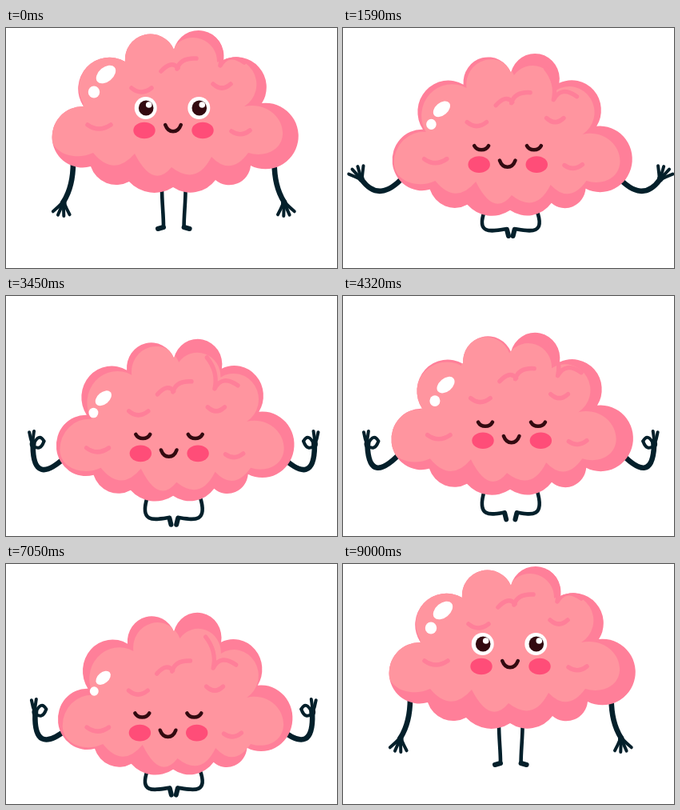
An HTML page with a canvas for the animation above (9.03 s loop, 414 px wide and 300 px high).

```html
<!DOCTYPE html>
<html lang="en">
<head>
<meta charset="utf-8">
<title>Calm brain</title>
<style>
html, body { margin: 0; width: 100%; height: 100%; overflow: hidden; background: #fff; }
canvas { display: block; width: 414px; height: 300px; }
</style>
</head>
<body>
<canvas id="stage" width="414" height="300"></canvas>
<script>
const ctx = document.getElementById('stage').getContext('2d');
const LOOP = 9030, MID = 211, AXIS = 209.8, BOB = 2220;
const DARK = '#ff7f99', LIGHT = '#ff959f', CHEEK = '#ff4d78', INK = '#330a10', LIMB = '#04202b';

const cloud = new Path2D(
  'M149 42 A31.8 31.8 0 0 1 210 27 A31.7 31.7 0 0 1 272 40' +
  'A37.6 37.6 0 0 1 320 94 A41.3 41.3 0 1 1 306 172' +
  'A26.8 26.8 0 0 1 262 190 A39 39 0 0 1 209 199' +
  'A43 43 0 0 1 154 192 A33.7 33.7 0 0 1 106 173' +
  'A38.2 38.2 0 1 1 97 98 A39.2 39.2 0 0 1 149 42Z');

const glow = new Path2D(
  'M149 40 A31.8 31.8 0 0 1 210 24 A30 30 0 0 1 264 43' +
  'A32.2 32.2 0 0 1 298 98 C325 92 348 112 346 134' +
  'C344 154 322 162 303 156 Q281 186 257 161 Q238 198 207 174' +
  'Q184 202 161 157 Q135 187 109 156 C88 166 57 158 56 134' +
  'A38.2 38.2 0 0 1 97 95 A39.2 39.2 0 0 1 149 40Z');

const folds = new Path2D(
  'M194 54 Q207 40 215 50 M214 51 Q218 37 238 38' +
  'M157 75 Q169 85 182 75 M259 70 Q270 80 281 70' +
  'M102 121 Q116 131 131 121 M282 129 Q294 137 305 128' +
  'M258 8 Q273 26 268 47 Q278 29 298 43');

const mix = (a, b, f) => a + (b - a) * f;
const mixAll = (a, b, f) => a.map((v, i) => mix(v, b[i], f));
const ramp = (t, a, b) => Math.min(1, Math.max(0, (t - a) / (b - a)));
const ease = (t, a, b) => (1 - Math.cos(Math.PI * ramp(t, a, b))) / 2;

// Fold is 0 standing and 1 seated; sink is 0 at the top of a bob and 1 at its foot.
function poseAt(t) {
  const bobbing = t > 2910 && t < 7350;
  const sink = bobbing ? (1 + Math.cos((t - 2910) / BOB * 2 * Math.PI)) / 2 : 1;
  const sway = bobbing ? (1 - Math.cos((t - 2910) / BOB * Math.PI)) / 2 : 0;
  const late = t > 5000;
  const p = late ? 1 - ease(t, 7350, 8656) : ease(t, 370, 2910);
  return {
    sink, sway,
    top: bobbing ? 42 + 22.5 * sink : 3 + 61.5 * p,
    wide: bobbing ? 0.989 - 0.044 * sink : 1 - 0.055 * p,
    dx: bobbing ? -7 + 12.3 * sway : -7 * p,
    dy: bobbing ? 7 + 28 * sink : 35 * p,
    out: late ? 1 - ease(t, 7850, 8720) : ease(t, 370, 1450),
    calm: late ? 1 - ease(t, 7300, 7850) : ease(t, 1450, 2550),
    fold: late ? 1 - ease(t, 7400, 8000) : ease(t, 500, 1400),
    shut: late ? 1 - ramp(t, 8180, 8360) : ramp(t, 720, 900)
  };
}

function oval(x, y, rx, ry, color, turn = 0) {
  ctx.fillStyle = color;
  ctx.beginPath();
  ctx.ellipse(x, y, rx, ry, turn, 0, 2 * Math.PI);
  ctx.fill();
}

function smile(x, y, w, h, width) {
  ctx.lineWidth = width;
  ctx.beginPath();
  ctx.moveTo(x - w, y);
  ctx.bezierCurveTo(x - w * 0.6, y + h, x + w * 0.6, y + h, x + w, y);
  ctx.stroke();
}

function mirrored(draw) {
  draw();
  ctx.save();
  ctx.translate(2 * AXIS, 0);
  ctx.scale(-1, 1);
  draw();
  ctx.restore();
}

function arm(p) {
  const up = p.top - 3;
  const rise = (1 - p.sink) * 9;
  const stand = [84, 168 + up, 84, 198 + up, 72, 217 + up];
  const open = [76, 186, 46, 219, 23, 190];
  const rest = [76, p.top + 146, 35 - rise * 0.3, 240, 38 - rise, 187];
  const [sx, sy, cx, cy, wx, wy] = mixAll(mixAll(stand, open, p.out), rest, p.calm);
  ctx.lineWidth = 6.6;
  ctx.beginPath();
  ctx.moveTo(sx, sy);
  ctx.quadraticCurveTo(cx, cy, wx, wy);
  ctx.stroke();

  const dir = mix(mix(101, 238, p.out), 268, p.calm) * Math.PI / 180 + Math.PI / 2;
  // Each finger: control point and tip, spread then pinched into a ring.
  const spread = [-36, -12, 12, 36].map(a => {
    const r = a * Math.PI / 180;
    return [Math.sin(r) * 9, -Math.cos(r) * 10, Math.sin(r) * 18, -Math.cos(r) * 18];
  });
  const pinch = [[-3, -9, -4, -17], [0, -10, 2, -18], [8, -17, 14, -5], [9, 8, 14, -5]];
  ctx.save();
  ctx.translate(wx, wy);
  ctx.rotate(dir);
  ctx.lineWidth = 4;
  spread.forEach((f, i) => {
    const [ax, ay, bx, by] = mixAll(f, pinch[i], p.calm);
    ctx.beginPath();
    ctx.moveTo(0, 0);
    ctx.quadraticCurveTo(ax, ay, bx, by);
    ctx.stroke();
  });
  oval(0, -2, 4, 5, LIMB);
  ctx.restore();
}

function leg(p) {
  const toe = 277 + 14 * (1 - (1 - p.sink) ** 2) - p.top + 3;
  const foot = mix(232, toe, p.calm);
  const gap = p.sway * 4;
  const stand = [195, 200, 195, 218, 197, 233, 197, 248, 190, 251];
  const seat = [177, 200, 166, foot - 3, 186, foot - 8, 205 - gap, foot - 11, 207 - gap, foot - 2];
  const q = mixAll(stand, seat, p.fold);
  ctx.save();
  ctx.translate(0, p.top - 3);
  ctx.lineWidth = 4.6;
  ctx.beginPath();
  ctx.moveTo(q[0], q[1]);
  ctx.bezierCurveTo(q[2], q[3], q[4], q[5], q[6], q[7]);
  ctx.stroke();
  ctx.lineWidth = 6;
  ctx.beginPath();
  ctx.moveTo(q[6], q[7] + 1);
  ctx.lineTo(q[8], q[9]);
  ctx.stroke();
  ctx.restore();
}

function brain(p) {
  const depth = p.dy / 35;
  ctx.save();
  ctx.translate(MID, p.top - 3);
  ctx.scale(p.wide, 1);
  ctx.translate(-MID, 0);
  ctx.fillStyle = DARK;
  ctx.fill(cloud);
  ctx.clip(cloud);

  // The lit area slides against the turn of the face.
  ctx.save();
  ctx.translate(-1.2 * p.dx, 13 * depth);
  ctx.fillStyle = LIGHT;
  ctx.fill(glow);
  ctx.restore();

  ctx.translate(p.dx, p.dy * 0.84);
  ctx.strokeStyle = DARK;
  ctx.lineWidth = 5.5;
  ctx.stroke(folds);
  ctx.restore();

  const size = 1 - 0.28 * depth;
  const hx = MID + (125 - MID) * p.wide + p.dx * 1.15;
  const hy = p.top + 55 + p.dy * 0.88;
  oval(hx, hy, 14 * size, 9 * size, '#fff', -0.7);
  oval(hx - 15 * size, hy + 22 * size, 7.2 * size, 7.6 * size, '#fff');
}

function face(p) {
  const x = 209 + p.dx;
  const squeeze = 0.5 + p.wide / 2;
  const cheekY = p.top + 125 + p.dy * 0.84;
  const eyeY = p.top + mix(97, 106, p.shut) + p.dy * 0.75;
  const mouthY = p.top + 118 + p.dy * 0.96;
  for (const side of [-1, 1]) {
    oval(x + 0.5 + side * 36.5 * squeeze, cheekY, 13.7, 10.3, CHEEK);
    const ex = x - 1 + side * 33.3 * squeeze;
    if (p.shut < 1) {
      const open = 1 - p.shut;
      oval(ex, eyeY, 14, 14 * open, '#fff');
      oval(ex + 0.5, eyeY, 9.3, 9.5 * open, INK);
      oval(ex + 4, eyeY - 4 * open, 3.8, 3.8 * open, '#fff');
    }
    if (p.shut > 0.7) {
      ctx.strokeStyle = INK;
      smile(ex + 1.3, eyeY - 3, 9, 6.8, 4.5);
    }
  }
  ctx.strokeStyle = INK;
  smile(x, mouthY, 9.8, 11, 4.5);
}

function frame(now) {
  const p = poseAt(now % LOOP);
  ctx.fillStyle = '#fff';
  ctx.fillRect(0, 0, 414, 300);
  ctx.lineCap = ctx.lineJoin = 'round';
  ctx.strokeStyle = LIMB;
  mirrored(() => { arm(p); leg(p); });
  brain(p);
  face(p);
}

let start;
function tick(now) {
  if (start === undefined) start = now;
  frame(now - start);
  requestAnimationFrame(tick);
}
frame(0);
requestAnimationFrame(tick);
</script>
</body>
</html>
```
